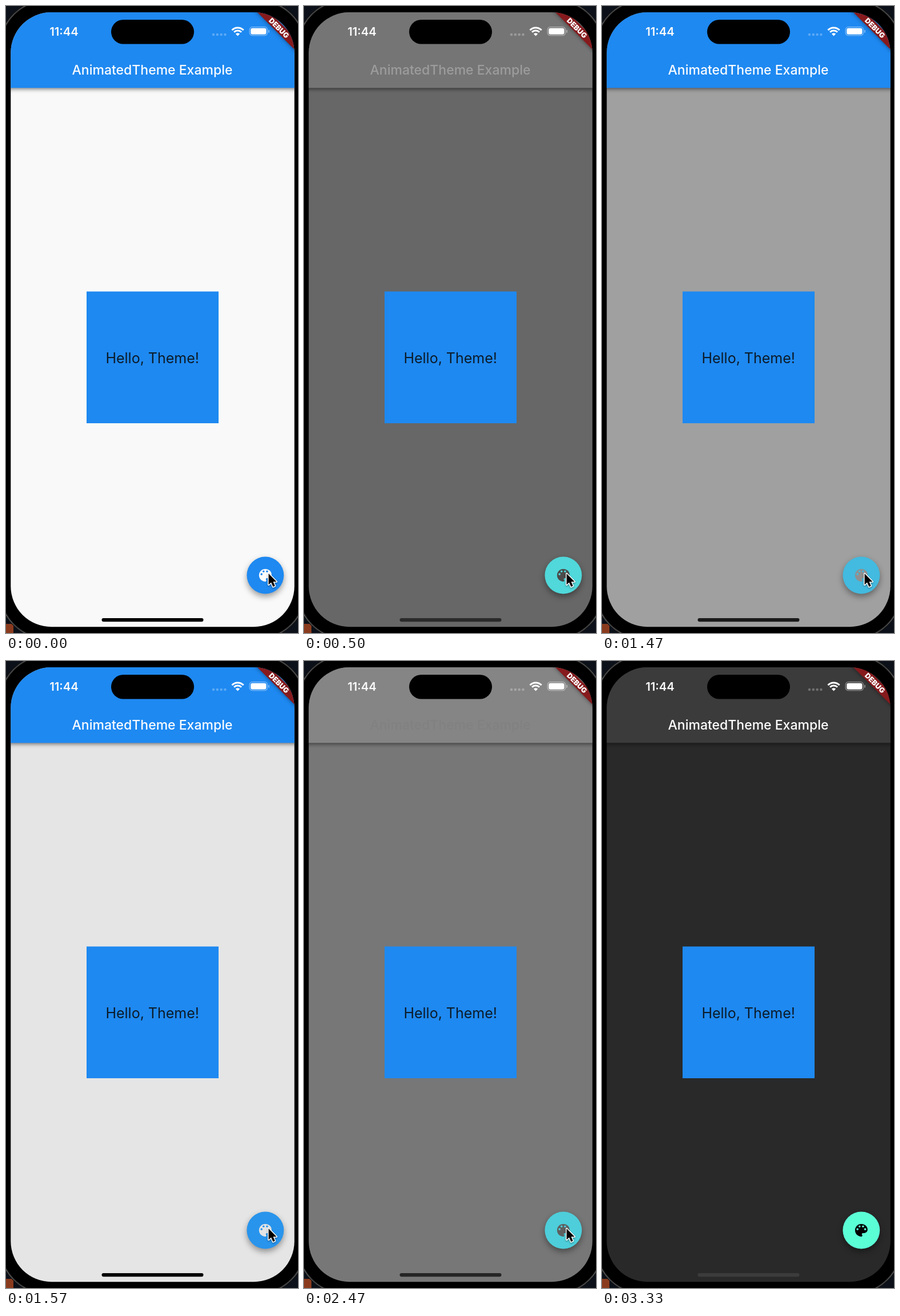
These frames come from a looping animation (511 by 1097 pixels, 3.96 s). An HTML page with a canvas:

```html
<!DOCTYPE html>
<html lang="en">
<head>
<meta charset="utf-8">
<title>Animated theme</title>
<style>
html, body { margin: 0; width: 511px; height: 1097px; overflow: hidden; background: #000; }
canvas { display: block; }
</style>
</head>
<body>
<canvas id="stage" width="511" height="1097"></canvas>
<script>
const ctx = document.getElementById('stage').getContext('2d');
const LOOP = 3960;
const FADE = 300;
const FONT = 'Inter, Roboto, sans-serif';
const BLUE = [30, 137, 241];
const TEAL = [91, 255, 214];

// Each click shows a ring while pressed and switches the theme on release.
const CLICKS = [
  { press: 30, release: 290, dark: 1 },
  { press: 1040, release: 1300, dark: 0 },
  { press: 1970, release: 2284, dark: 1 }
];

const clamp = v => Math.min(1, Math.max(0, v));
const mix = (a, b, p) => a + (b - a) * p;
const rgb = c => `rgb(${c.map(Math.round).join(',')})`;
const gray = v => rgb([v, v, v]);

function darkness(t) {
  let level = 0;
  for (const click of CLICKS) {
    if (t >= click.release) level = mix(1 - click.dark, click.dark, clamp((t - click.release) / FADE));
  }
  return level;
}

function box(x, y, w, h, r, fill) {
  ctx.beginPath();
  ctx.roundRect(x, y, w, h, r);
  ctx.fillStyle = fill;
  ctx.fill();
}

function disc(x, y, r, fill) {
  ctx.beginPath();
  ctx.arc(x, y, r, 0, Math.PI * 2);
  ctx.fillStyle = fill;
  ctx.fill();
}

function label(text, x, y, size, weight, fill) {
  ctx.font = `${weight} ${size}px ${FONT}`;
  ctx.textAlign = 'center';
  ctx.fillStyle = fill;
  ctx.fillText(text, x, y);
}

function shadow(color, blur, dy) {
  ctx.shadowColor = color;
  ctx.shadowBlur = blur;
  ctx.shadowOffsetY = dy;
}

function drawCase() {
  ctx.fillStyle = '#0b1019';
  ctx.fillRect(0, 0, 511, 1097);
  ctx.fillStyle = '#8a3b1e';
  ctx.fillRect(0, 1081, 13, 16);
  box(-11, -10, 535, 1117, 84, '#000');
  ctx.lineWidth = 4;
  ctx.strokeStyle = '#161616';
  ctx.stroke();
  ctx.lineWidth = 1.3;
  ctx.strokeStyle = '#5c5c5c';
  ctx.stroke();
}

function drawBanner() {
  ctx.save();
  ctx.translate(504.5, 11);
  ctx.rotate(Math.PI / 4);
  shadow('rgba(0,0,0,.5)', 7, 0);
  ctx.fillStyle = '#861a1d';
  ctx.fillRect(-60, 30.5, 120, 15.2);
  ctx.shadowColor = 'transparent';
  label('DEBUG', 0.5, 43, 12.6, 900, '#fff');
  ctx.restore();
}

function drawStatus() {
  label('11:44', 101.5, 52, 20.3, 600, '#fafafa');
  box(184, 24, 145, 42.5, 21.2, '#000');
  for (let i = 0; i < 4; i++) disc(363 + i * 6.8, 50, 2.3, 'rgba(255,255,255,.27)');

  // Wi-Fi: two arcs above a small wedge.
  ctx.strokeStyle = '#fff';
  ctx.lineWidth = 3;
  for (const r of [9, 14]) {
    ctx.beginPath();
    ctx.arc(405.5, 52, r, -Math.PI * 0.755, -Math.PI * 0.245);
    ctx.stroke();
  }
  ctx.fillStyle = '#fff';
  ctx.beginPath();
  ctx.moveTo(405.5, 52.5);
  ctx.arc(405.5, 52.5, 5.2, -Math.PI * 0.75, -Math.PI * 0.25);
  ctx.fill();

  ctx.strokeStyle = 'rgba(255,255,255,.42)';
  ctx.lineWidth = 1.3;
  ctx.beginPath();
  ctx.roundRect(426.2, 36.7, 31.2, 15, 5);
  ctx.stroke();
  box(428.2, 38.7, 27.2, 11, 3.2, '#fff');
  box(459, 41.8, 1.8, 5, 1, 'rgba(255,255,255,.42)');
}

function drawBar(p) {
  const isDark = p >= 0.5;
  ctx.save();
  shadow('rgba(0,0,0,.5)', 7, 2.5);
  ctx.fillStyle = isDark ? gray(mix(255, 59, p)) : rgb(BLUE);
  ctx.fillRect(-20, -20, 551, 163.3);
  ctx.restore();
  const ink = isDark ? gray(255 * clamp(1.31 * p - 0.31)) : '#fafcff';
  label('AnimatedTheme Example', 256, 119.5, 23, 500, ink);
}

const palette = new Path2D('M12 3C7 3 3 7 3 12s4 9 9 9c.8 0 1.5-.7 1.5-1.5 0-.4-.15-.74-.39-1-.23-.27-.38-.62-.38-1 0-.83.67-1.5 1.5-1.5H16c2.76 0 5-2.24 5-5 0-4.4-4-8-9-8z');
for (const [x, y] of [[6.5, 10.5], [9.5, 6.5], [14.5, 6.5], [17.5, 10.5]]) {
  palette.moveTo(x + 1.5, y);
  palette.arc(x, y, 1.5, 0, Math.PI * 2);
}

function drawButton(p) {
  ctx.save();
  shadow('rgba(0,0,0,.38)', 11, 5);
  disc(453.8, 996, 32.4, rgb(BLUE.map((c, i) => mix(c, TEAL[i], p))));
  ctx.restore();
  disc(453.8, 996, 32.4, `rgba(160,160,160,${0.1 * Math.sin(Math.PI * p)})`);
  ctx.save();
  ctx.translate(453.8, 996);
  ctx.scale(1.22, 1.22);
  ctx.translate(-12, -12);
  ctx.fillStyle = gray(mix(252, 0, p));
  ctx.fill(palette, 'evenodd');
  ctx.restore();
}

function drawRing() {
  ctx.beginPath();
  ctx.arc(459.5, 995, 27.2, 0, Math.PI * 2);
  ctx.strokeStyle = 'rgba(255,255,255,.9)';
  ctx.lineWidth = 4.2;
  ctx.stroke();
  ctx.strokeStyle = '#000';
  ctx.lineWidth = 2.2;
  ctx.stroke();
}

const arrow = new Path2D('M0 0V18.5L4.3 14.6 7.4 21.8 10.6 20.4 7.5 13.4H13.2Z');

function drawCursor(t) {
  const leave = clamp((t - 2970) / 180);
  if (leave === 1) return;
  ctx.save();
  ctx.translate(459.5 + 60 * leave * leave, 993 + 20 * leave * leave);
  ctx.scale(1.06, 1.06);
  shadow('rgba(0,0,0,.35)', 3, 1.5);
  ctx.lineJoin = 'round';
  ctx.strokeStyle = '#fff';
  ctx.lineWidth = 2.8;
  ctx.stroke(arrow);
  ctx.shadowColor = 'transparent';
  ctx.fillStyle = '#000';
  ctx.fill(arrow);
  ctx.restore();
}

function draw(t) {
  const p = darkness(t);
  drawCase();
  ctx.save();
  ctx.beginPath();
  ctx.roundRect(8.3, 11, 496.4, 1075.2, 71);
  ctx.clip();
  ctx.fillStyle = gray(mix(249, 41, p));
  ctx.fillRect(0, 0, 511, 1097);
  drawBar(p);
  ctx.fillStyle = rgb(BLUE);
  ctx.fillRect(141, 499.5, 231, 230.5);
  label('Hello, Theme!', 256.2, 624.5, 25, 400, 'rgba(10,10,10,.87)');
  drawButton(p);
  drawBanner();
  drawStatus();
  box(167.5, 1071, 178, 6.2, 3.1, gray(60 * p));
  ctx.restore();
  if (CLICKS.some(c => t >= c.press && t < c.release)) drawRing();
  drawCursor(t);
}

const start = performance.now();
function tick() {
  draw((performance.now() - start) % LOOP);
  requestAnimationFrame(tick);
}
tick();
</script>
</body>
</html>
```
